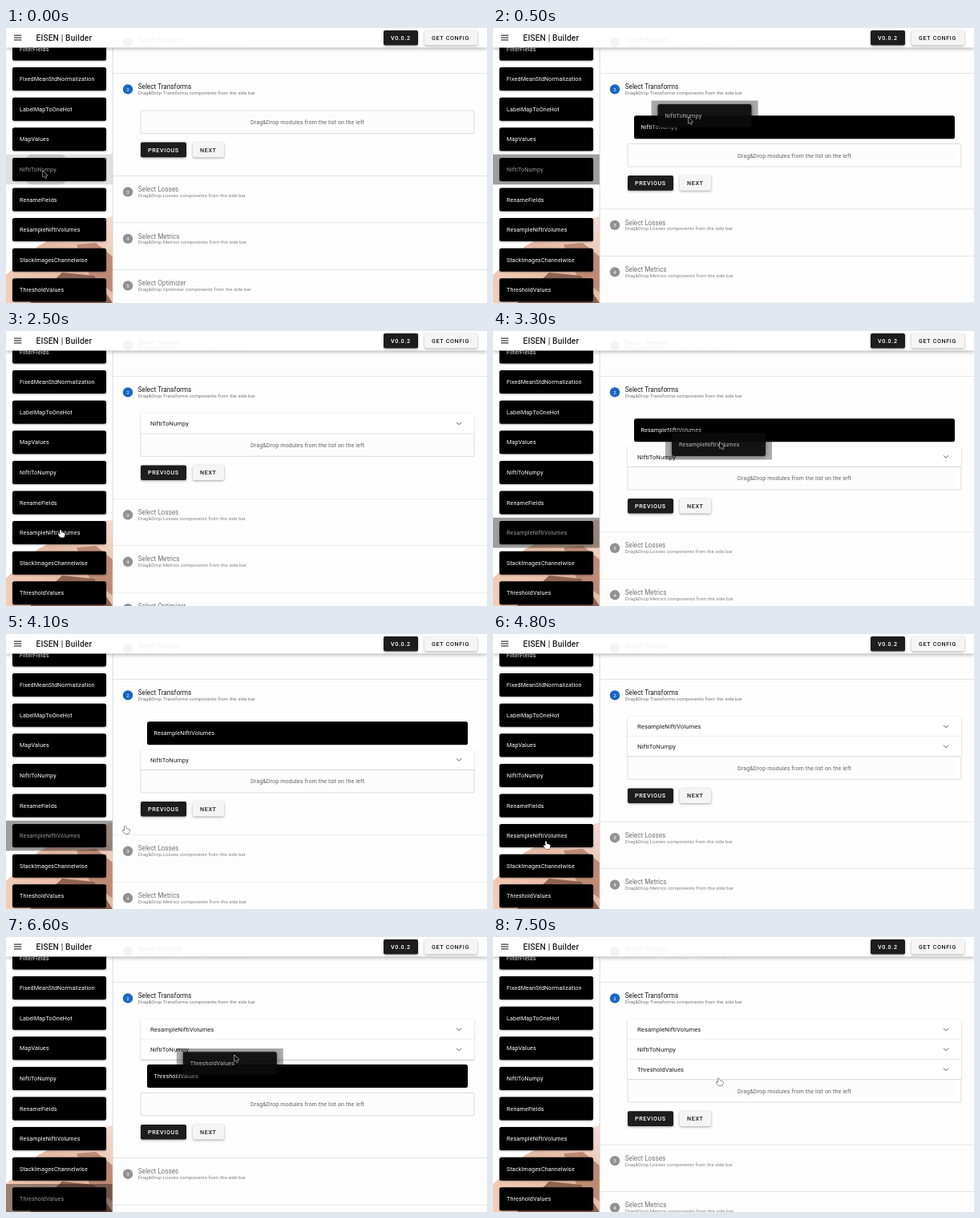
An HTML page with a canvas for the animation above (7.6 s loop, 600 px wide and 343 px high).

```html
<!DOCTYPE html>
<html lang="en">
<head>
<meta charset="utf-8">
<title>Builder</title>
<style>
html, body { margin: 0; width: 100%; height: 100%; overflow: hidden; background: #fff }
canvas { display: block; width: 600px; height: 343px }
</style>
</head>
<body>
<canvas id="stage"></canvas>
<script>
const LOOP = 7600, TICK = 100;
const canvas = document.getElementById('stage');
const dpr = window.devicePixelRatio || 1;
canvas.width = 600 * dpr;
canvas.height = 343 * dpr;
const ctx = canvas.getContext('2d');
ctx.scale(dpr, dpr);

const modules = ['FilterFields', 'FixedMeanStdNormalization', 'LabelMapToOneHot', 'MapValues',
  'NiftiToNumpy', 'RenameFields', 'ResampleNiftiVolumes', 'StackImagesChannelwise', 'ThresholdValues'];
const steps = ['Readers', 'Transforms', 'Losses', 'Metrics', 'Optimizer'];
const [NIFTI, RESAMPLE, THRESHOLD] = [4, 6, 8];
const ROW = 37.6, PANEL = 24.9, SLOT = 41.5, ZONE = 28.5;

// A drag: picked row, grab, release and row-reset times
const drags = [
  { row: NIFTI, grab: 0, release: 900, reset: 1200 },
  { row: RESAMPLE, grab: 2700, release: 3500, reset: 4500 },
  { row: THRESHOLD, grab: 5500, release: 6700, reset: 7500 }
];

// List contents from each time on: row = panel, 'zone' = drop hint, {slot} = placeholder
const lists = [
  [0, ['zone']],
  [400, [{ slot: NIFTI }, 'zone']],
  [1000, [NIFTI, 'zone']],
  [3200, [{ slot: RESAMPLE }, NIFTI, 'zone']],
  [4300, [RESAMPLE, NIFTI, 'zone']],
  [5900, [RESAMPLE, NIFTI, 'zone', { slot: THRESHOLD }]],
  [6300, [RESAMPLE, NIFTI, { slot: THRESHOLD }, 'zone']],
  [7200, [RESAMPLE, NIFTI, THRESHOLD, 'zone']]
];

// Pointer path: time, x, y
const path = [
  [0, 46, 178], [100, 52, 176], [300, 160, 138], [500, 243.5, 111], [700, 250, 102],
  [900, 252, 102], [1200, 266, 119], [1300, 266, 119], [1500, 200, 170], [1750, 60, 298],
  [1900, 14, 292], [2100, 125, 221], [2500, 68, 248.5], [2700, 68, 248.5], [2800, 88, 240],
  [3200, 270, 148], [3300, 283, 138.5], [3500, 284, 138], [4200, 126, 257], [4800, 66, 259],
  [5300, 72, 316], [5500, 72, 316], [5800, 165, 227], [5900, 278, 156], [6200, 288, 135],
  [6700, 284, 150], [7300, 281.5, 176.5], [7600, 281.5, 176.5]
];

function pointerAt(t) {
  const i = path.findIndex(p => p[0] > t);
  const [t0, x0, y0] = path[i - 1], [t1, x1, y1] = path[i];
  const k = (t - t0) / (t1 - t0);
  return [x0 + (x1 - x0) * k, y0 + (y1 - y0) * k];
}

function box(x, y, w, h, fill, r = 0, stroke) {
  ctx.beginPath();
  ctx.roundRect(x, y, w, h, r);
  if (fill) { ctx.fillStyle = fill; ctx.fill(); }
  if (stroke) { ctx.strokeStyle = stroke; ctx.lineWidth = .7; ctx.stroke(); }
}

function shaded(blur, dy, alpha, draw) {
  ctx.save();
  ctx.shadowColor = `rgba(0,0,0,${alpha})`;
  ctx.shadowBlur = blur * dpr;
  ctx.shadowOffsetY = dy * dpr;
  draw();
  ctx.restore();
}

function text(s, x, y, size, color, { spacing = 0, weight = 400, align = 'left' } = {}) {
  ctx.font = `${weight} ${size}px Roboto, sans-serif`;
  ctx.letterSpacing = spacing + 'px';
  ctx.textAlign = align;
  ctx.fillStyle = color;
  ctx.fillText(s, x, y);
}

function poly(points, fill) {
  ctx.beginPath();
  points.forEach(p => ctx.lineTo(...p));
  ctx.closePath();
  ctx.fillStyle = fill;
  ctx.fill();
}

const rowY = row => 26 + row * ROW;
const label = (s, x, cy, color) => text(s, x, cy + 2.5, 7.16, color, { spacing: .128 });

function button(s, x, cy, w, dark) {
  shaded(3, 1, .35, () => box(x, cy - 9.3, w, 18.6, dark ? '#1d1d1d' : '#f5f5f5', 2));
  text(s, x + 9, cy + 2.6, 7.16, dark ? '#fff' : '#1d1d1d', { spacing: .64, weight: 500 });
}

function photo() {
  const g = ctx.createLinearGradient(133, 235, 20, 343);
  g.addColorStop(0, '#f3dccf');
  g.addColorStop(.5, '#e3b9a3');
  g.addColorStop(1, '#f2cdb8');
  poly([[133, 235], [90, 246], [40, 272], [0, 308], [0, 343], [133, 343]], g);
  poly([[133, 285], [112, 268], [88, 270], [104, 308], [133, 330]], '#bd8a74');
  poly([[30, 343], [70, 305], [110, 309], [133, 343]], '#8d6353');
}

function sidebar(t) {
  box(0, 0, 133, 343, '#fff');
  photo();
  const drag = drags.find(d => t >= d.grab && t < d.reset);
  modules.forEach((name, i) => {
    const cy = rowY(i), active = drag && drag.row === i;
    if (active) {
      const start = t < 100;
      box(0, cy - ROW / 2, 133, ROW, start ? 'rgba(0,0,0,.12)' : 'rgba(0,0,0,.38)');
      if (start) box(25, cy - ROW / 2, 50, ROW, 'rgba(0,0,0,.14)', 7);
    }
    shaded(2, .7, .4, () => box(8, cy - 14.5, 117, 29, '#000', 2.5));
    label(name, 17, cy, active ? '#999' : '#fff');
  });
  box(132.7, 0, .8, 343, '#d2d2d2');
}

function step(i, y, active) {
  if (i) box(133.5, y - 17, 466.5, .7, '#dedede');
  ctx.beginPath();
  ctx.arc(152, y + 3.4, 6.2, 0, 7);
  ctx.fillStyle = active ? '#1867c0' : '#929292';
  ctx.fill();
  text(i + 1, 152, y + 5.6, 6.1, '#fff', { align: 'center' });
  text('Select ' + steps[i], 164.7, y + 3, 8.18, active ? '#1a1a1a' : '#757575');
  text(`Drag&Drop ${steps[i]} components from the side bar`, 164.7, y + 9.9, 6.14,
    active ? '#777' : '#858585');
}

function panel(name, y) {
  shaded(2, .7, .3, () => box(168, y, 416, PANEL, '#fff', 1));
  text(name, 180, y + 15.2, 7.7, '#1d1d1d', { spacing: .05 });
  ctx.beginPath();
  ctx.moveTo(562, y + 10.8);
  ctx.lineTo(565, y + 13.8);
  ctx.lineTo(568, y + 10.8);
  ctx.strokeStyle = '#555';
  ctx.lineWidth = 1;
  ctx.stroke();
}

function content(t) {
  box(133, 0, 467, 343, '#fdfdfd');
  step(1, 73, true);
  let y = 103;
  for (const item of lists.findLast(l => l[0] <= t)[1]) {
    if (item === 'zone') {
      box(168, y, 416, ZONE, '#fcfcfc', 1, '#d0d0d0');
      text('Drag&Drop modules from the list on the left', 376, y + 17, 7.16, '#666',
        { spacing: .1, align: 'center' });
      y += ZONE;
    } else if (item.slot) {
      box(176, y + 6.2, 400, 29, '#000', 2.5);
      label(modules[item.slot], 184.5, y + 20.7, '#fff');
      y += SLOT;
    } else {
      panel(modules[item], y);
      y += PANEL;
    }
  }
  button('PREVIOUS', 168, y + 20.4, 57, true);
  button('NEXT', 233, y + 20.4, 39, false);
  for (let i = 2; i < 5; i++) step(i, y + 69.5 + 58.5 * (i - 2), false);
}

function header() {
  shaded(5, 1.5, .35, () => box(0, 0, 600, 24.5, '#fff'));
  ctx.save();
  ctx.globalAlpha = .1;
  step(0, 14.5, false);
  ctx.restore();
  for (const y of [8.6, 11.5, 14.4]) box(10, y, 9.3, 1.1, '#222');
  text('EISEN | Builder', 37.5, 15.8, 10.23, '#222', { spacing: .128, weight: 500 });
  button('V0.0.2', 471, 12.2, 43, true);
  button('GET CONFIG', 522, 12.2, 66, false);
}

function ghost(drag, x, y) {
  const [, gx, gy] = path.find(p => p[0] === drag.grab);
  const dx = x - gx, cy = rowY(drag.row) + y - gy;
  box(dx, cy - ROW / 2, 133, ROW, 'rgba(0,0,0,.33)');
  shaded(5, 1, .5, () => box(dx + 8, cy - 14.5, 117, 29, 'rgba(12,12,12,.9)', 2.5));
  label(modules[drag.row], dx + 17, cy, '#b4b4b4');
}

function pointer(x, y, arrow) {
  ctx.save();
  ctx.translate(x, y);
  ctx.lineJoin = 'round';
  ctx.lineWidth = .9;
  const shape = new Path2D(arrow
    ? 'M0 0V8L1.9 6.4L3.2 9.3L4.6 8.7L3.4 5.9H5.8Z'
    : 'M-.8 0Q.6-1 1 .5L1.4 3Q2.2 2.4 2.9 3.2Q3.8 2.8 4.2 3.7Q5.4 3.4 5.5 4.6L5 7.6L4.3 9H-.2L-3 5.5Q-3.2 4.2-1.9 4.5L-.6 5.6Z');
  ctx.fillStyle = arrow ? '#111' : '#fff';
  ctx.strokeStyle = arrow ? '#fff' : '#111';
  ctx.stroke(shape);
  ctx.fill(shape);
  ctx.restore();
}

function frame(now) {
  const t = Math.floor(now % LOOP / TICK) * TICK;
  const [x, y] = pointerAt(t);
  const drag = drags.find(d => t >= d.grab && t < d.release);
  content(t);
  sidebar(t);
  header();
  if (drag && t > 0) ghost(drag, x, y);
  pointer(x, y, drag);
  requestAnimationFrame(frame);
}
requestAnimationFrame(frame);
</script>
</body>
</html>
```
